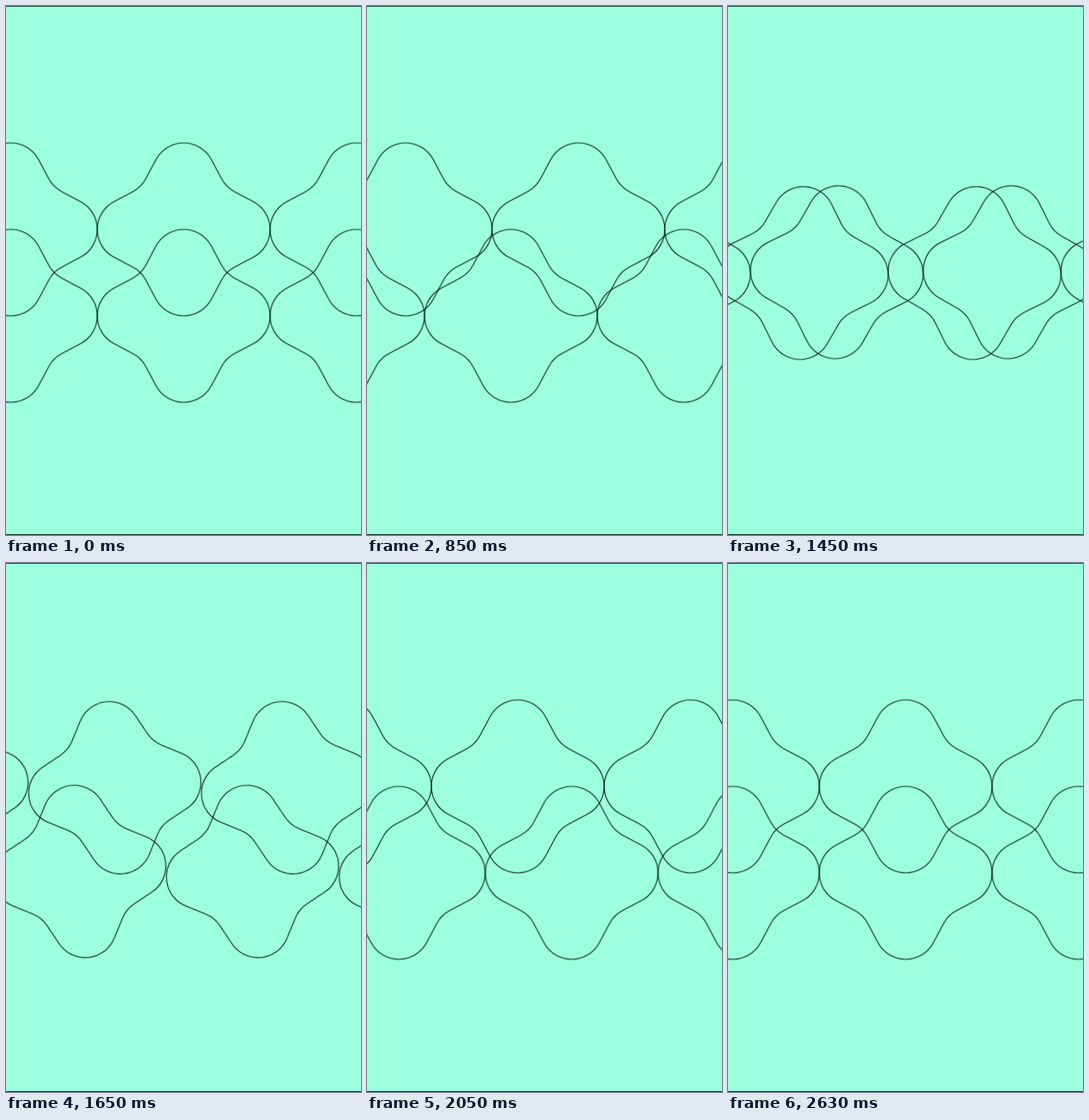
Write an HTML page that moves like this. It is 452x673 px and loops after 2720 ms.

```html
<!DOCTYPE html>
<html lang="en">
<head>
<meta charset="utf-8">
<title>Swapping tiles</title>
<style>
  html, body { margin: 0; width: 100%; height: 100%; overflow: hidden; background: #9cffdd; }
  svg { display: block; width: 452px; height: 673px; }
  .row { fill: none; stroke: #06201a; stroke-width: 1.15; }
  .top { --dir: 1; }
  .bottom { --dir: -1; }
  .slide, .swap, .tile {
    animation: 2720ms linear infinite;
    transform-origin: 0 0;
  }
  .slide { animation-name: slide; }
  .swap { animation-name: swap; }
  .tile { animation-name: spin; }

  /* rows slide apart, trade places while turning, then slide back */
  @keyframes slide {
    0% { transform: translateX(0); }
    19.23% { transform: translateX(0); animation-timing-function: cubic-bezier(.77, 0, .175, 1); }
    44.49% { transform: translateX(calc(var(--dir) * 87.7px)); }
    63.38% { transform: translateX(calc(var(--dir) * 87.7px)); animation-timing-function: cubic-bezier(.77, 0, .175, 1); }
    87.28%, 100% { transform: translateX(0); }
  }
  @keyframes swap {
    0% { transform: translateY(0); }
    43.46% { transform: translateY(0); animation-timing-function: cubic-bezier(.77, 0, .175, 1); }
    64.04%, 100% { transform: translateY(calc(var(--dir) * 110px)); }
  }
  @keyframes spin {
    0% { transform: rotate(0deg); }
    43.46% { transform: rotate(0deg); animation-timing-function: cubic-bezier(.77, 0, .175, 1); }
    64.04%, 100% { transform: rotate(360deg); }
  }
</style>
</head>
<body>
<svg viewBox="0 0 452 673">
  <defs>
    <path id="tile" d="M-35.3-88.8 A40 40 0 0 1 35.3-88.8
      L48.1-64.7 A40 40 0 0 0 64.7-48.1 L88.8-35.3 A40 40 0 0 1 88.8 35.3
      L64.7 48.1 A40 40 0 0 0 48.1 64.7 L35.3 88.8 A40 40 0 0 1 -35.3 88.8
      L-48.1 64.7 A40 40 0 0 0 -64.7 48.1 L-88.8 35.3 A40 40 0 0 1 -88.8-35.3
      L-64.7-48.1 A40 40 0 0 0 -48.1-64.7 Z"/>
  </defs>
  <g class="row top" transform="translate(226.2 284.2)">
    <g class="slide"><g class="swap">
      <g transform="translate(-220 0)"><use href="#tile" class="tile"/></g>
      <g><use href="#tile" class="tile"/></g>
      <g transform="translate(220 0)"><use href="#tile" class="tile"/></g>
    </g></g>
  </g>
  <g class="row bottom" transform="translate(226.2 394.2)">
    <g class="slide"><g class="swap">
      <g transform="translate(-220 0)"><use href="#tile" class="tile"/></g>
      <g><use href="#tile" class="tile"/></g>
      <g transform="translate(220 0)"><use href="#tile" class="tile"/></g>
    </g></g>
  </g>
  <rect width="452" height="1" fill="#1d4a3d"/>
  <rect y="672" width="452" height="1" fill="#0a1f18"/>
</svg>
</body>
</html>
```
